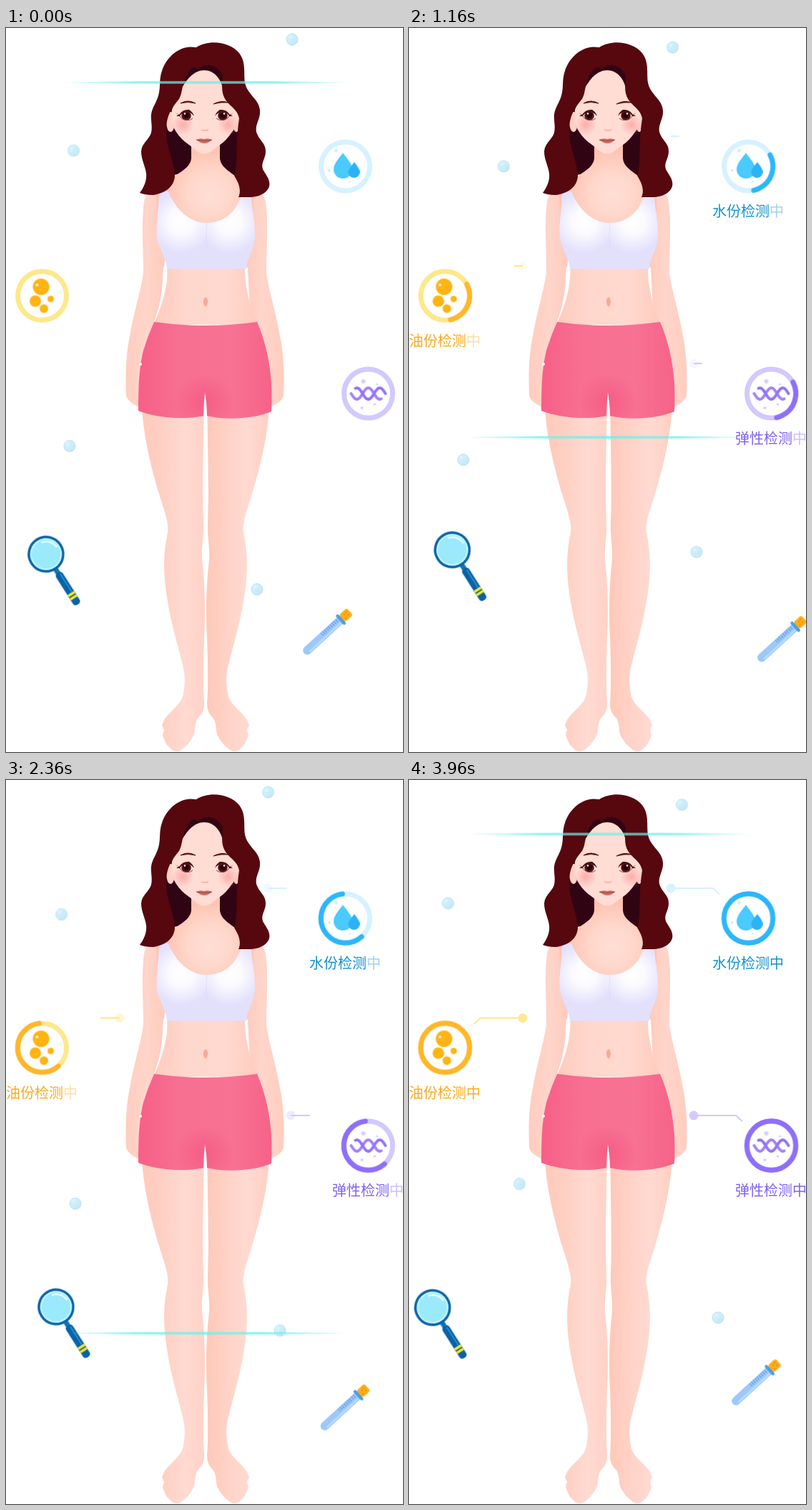
Animation, 555 px wide and 1010 px high, one loop 4 s. Source, as an HTML page:

```html
<!DOCTYPE html>
<html lang="zh-CN">
<head>
<meta charset="utf-8">
<title>检测中</title>
<style>
html, body { margin: 0; width: 100%; height: 100%; overflow: hidden; background: #fff; }
svg { display: block; width: 555px; height: 1010px; }
text { font: 20px "Noto Sans CJK SC", "Noto Sans CJK", sans-serif; }
.track, .arc, .link { fill: none; }
.track, .arc { stroke-width: 7; }
.arc { stroke-linecap: round; animation: spin 4s linear infinite, show 4s step-end infinite; }
.link { stroke-width: 2; stroke-dasharray: 1 1; }
.scan { animation: scan 4s linear infinite; }
@keyframes spin {
  0% { transform: rotate(-90deg); stroke-dasharray: 0 360; }
  99%, 100% { transform: rotate(1350deg); stroke-dasharray: 360 360; }
}
@keyframes show { 0% { opacity: 0; } 0.9%, 100% { opacity: 1; } }
@keyframes scan {
  0%, 99%, 100% { transform: translateY(75.5px); }
  50% { transform: translateY(929px); }
}
</style>
</head>
<body>
<svg viewBox="0 0 555 1010">
  <defs>
    <linearGradient id="legL">
      <stop offset="0" stop-color="#ffcabb"/><stop offset=".35" stop-color="#ffd0c4"/>
      <stop offset=".68" stop-color="#ffdad1"/><stop offset="1" stop-color="#ffd2c7"/>
    </linearGradient>
    <linearGradient id="legR">
      <stop offset="0" stop-color="#ffcfc3"/><stop offset=".35" stop-color="#ffdad1"/>
      <stop offset=".65" stop-color="#ffd3c8"/><stop offset="1" stop-color="#ffc8b8"/>
    </linearGradient>
    <linearGradient id="arm">
      <stop offset="0" stop-color="#ffcdbf"/><stop offset=".5" stop-color="#ffd5ca"/>
      <stop offset="1" stop-color="#fecabb"/>
    </linearGradient>
    <linearGradient id="belly">
      <stop offset="0" stop-color="#ffcbbc"/><stop offset=".3" stop-color="#ffd7cc"/>
      <stop offset=".7" stop-color="#ffd9cf"/><stop offset="1" stop-color="#ffcbbc"/>
    </linearGradient>
    <linearGradient id="shorts">
      <stop offset="0" stop-color="#f75f87"/><stop offset=".3" stop-color="#f76f91"/>
      <stop offset=".7" stop-color="#f77293"/><stop offset="1" stop-color="#f66289"/>
    </linearGradient>
    <radialGradient id="crotch">
      <stop offset="0" stop-color="#f65c85"/><stop offset="1" stop-color="#f65c85" stop-opacity="0"/>
    </radialGradient>
    <radialGradient id="chest" gradientUnits="userSpaceOnUse" cx="284" cy="232" r="62">
      <stop offset="0" stop-color="#ffded5"/><stop offset=".5" stop-color="#ffd7cb"/>
      <stop offset="1" stop-color="#ffc3b1"/>
    </radialGradient>
    <radialGradient id="cup">
      <stop offset="0" stop-color="#fff"/><stop offset=".4" stop-color="#fff" stop-opacity=".85"/>
      <stop offset="1" stop-color="#fff" stop-opacity="0"/>
    </radialGradient>
    <radialGradient id="blush">
      <stop offset="0" stop-color="#f98f90" stop-opacity=".62"/><stop offset="1" stop-color="#f98f90" stop-opacity="0"/>
    </radialGradient>
    <linearGradient id="beam">
      <stop offset="0" stop-color="#6cf0ea" stop-opacity=".1"/><stop offset=".25" stop-color="#6cf0ea" stop-opacity=".75"/>
      <stop offset=".75" stop-color="#6cf0ea" stop-opacity=".75"/><stop offset="1" stop-color="#6cf0ea" stop-opacity=".1"/>
    </linearGradient>
    <linearGradient id="drop" x2="1" y2="1">
      <stop offset="0" stop-color="#d9f4fd"/><stop offset="1" stop-color="#bfe6f8"/>
    </linearGradient>
    <clipPath id="shortsClip"><use href="#shortsShape"/></clipPath>
    <clipPath id="topClip"><use href="#topShape"/></clipPath>
    <path id="leg" d="M190 530 C193 575 204 617 214 650 C222 676 228 690 226 704 C219 735 220 765 226 800 C232 838 245 876 249 898 C251 912 249 924 247 933 C243 945 229 953 221 965 L218 973 L221 979 L219 987 L222 994 L225 1000 L230 1005 C234 1010 241 1010 245 1007 C254 1001 260 992 263 985 C265 975 264 970 268 963 C274 957 277 952 277 942 C275 915 276 880 277 850 C279 815 278 775 274 742 C273 722 277 708 276 690 C274 640 276 590 277 510 Z"/>
    <path id="armShape" d="M212 226 C199 228 194 234 193 243 C189 270 192 310 192 342 C188 368 178 400 173 430 C167 458 167 490 168 513 C170 520 178 525 186 529 L190 470 L206 412 C214 392 219 370 219 346 L226 300 L218 240 Z"/>
    <path id="shortsShape" d="M207 410 Q279 420 351 410 C362 435 369 465 371 496 Q372 516 371 535 C345 546 306 547 281 541 Q281 522 278 508 Q276 524 276 541 C250 547 210 544 185 534 C185 500 186 475 192 450 Q198 430 207 410 Z"/>
    <path id="topShape" d="M214 226 L227 228 C237 254 258 272 280 272 C303 272 320 259 328 236 L343 235 C344 254 349 275 348 294 C346 311 337 320 336 336 L225 336 C224 320 214 309 211 294 C209 272 214 251 214 226 Z"/>
    <g id="eye">
      <path d="M-10 0 Q-5 -8 4 -7 Q9 -4 11 2 Q4 8 -4 6 Q-8 4 -10 0" fill="#fbe6e1"/>
      <ellipse rx="6.8" ry="6.8" fill="#561318"/><circle r="4" fill="#210408"/>
      <circle cx="-2" cy="-2.5" r="1.2" fill="#fff"/>
      <path d="M-15 -4 L-10 -1 Q-5 -9 4 -8 Q9 -5 11 1 Q6 -5 1 -5.500 Q-6 -5 -9 1 L-14 1 L-11 -1 Z" fill="#4b0b11"/>
      <path d="M-9 1 Q-6 6 0 6.500 Q6 7 9 4" fill="none" stroke="#8c3a3a"/>
    </g>
    <g id="bubble"><circle r="8" fill="url(#drop)" stroke="#b8e2f2"/><circle cx="-2.5" cy="-3" r="2" fill="#def5fd"/></g>
    <g id="glass" transform="rotate(57.5)">
      <path d="M24 0H36" stroke="#1274b8" stroke-width="7"/>
      <rect x="31" y="-5.5" width="52" height="11" rx="4.5" fill="#0763a8"/>
      <path d="M34 -2H64" stroke="#2a86c6" stroke-width="2"/>
      <path d="M66 -5.5v11M71.5 -5.5v11" stroke="#ffe51d" stroke-width="3.6"/>
      <circle r="24" fill="#9beafb" stroke="#0b65a8" stroke-width="3.6"/>
      <circle r="21" fill="none" stroke="#c9f5fd" stroke-width="2"/>
      <path d="M-16 7 A18 18 0 0 1 -10 -15" transform="rotate(35)" fill="none" stroke="#e6fbff" stroke-width="2.5"/>
    </g>
    <g id="tube" transform="rotate(137.5)">
      <path d="M10 -6 H73 A6 6 0 0 1 73 6 H10 Z" fill="#9dc8fb"/>
      <path d="M12 -3.5H72" stroke="#b8d9ff" stroke-width="3"/>
      <path d="M14 2.5H43" stroke="#6aa2ee" stroke-width="5" stroke-dasharray="1.5 2"/>
      <rect x="7" y="-9" width="4.5" height="18" rx="2" fill="#4b9eea"/>
      <rect x="-7.5" y="-6.5" width="14.5" height="13" rx="3" fill="#ffad17"/>
      <path d="M-4 -2h2M0 2h2M2 -3h2M-4 3h2" stroke="#e48b0c" stroke-width="1.5"/>
    </g>
  </defs>

  <!-- figure -->
  <path d="M226 95 C232 65 254 44 282 44 C305 44 312 70 318 98 L328 130 V208 H318 L279 196 L230 206 C221 170 221 135 226 95" fill="#310413"/>
  <use href="#leg" fill="url(#legL)"/>
  <use href="#leg" fill="url(#legR)" transform="translate(558) scale(-1 1)"/>
  <use href="#armShape" fill="url(#arm)"/>
  <use href="#armShape" fill="url(#arm)" transform="translate(556) scale(-1 1)"/>
  <path d="M220 334 L217 392 L225 352 L226 334 Z M338 334 L341 394 L334 352 L333 334 Z" fill="#fff"/>
  <path d="M212 270 V300 L225 330 C227 352 222 380 206 414 H352 C338 382 333 352 334 330 L348 300 L346 270 Z" fill="url(#belly)"/>
  <path d="M259 160 V182 C257 200 231 203 210 230 L212 280 H346 V230 C326 204 301 200 299 182 V160 Z" fill="url(#chest)"/>
  <ellipse cx="279" cy="382" rx="3" ry="6.5" fill="#f8a995"/>
  <use href="#topShape" fill="#e3e0fc"/>
  <g clip-path="url(#topClip)">
    <circle cx="245" cy="270" r="44" fill="url(#cup)"/>
    <circle cx="313" cy="270" r="44" fill="url(#cup)"/>
    <path d="M281 272 Q279 290 281 308" fill="none" stroke="#d6d1f7" stroke-width="1.5" opacity=".4"/>
  </g>
  <use href="#shortsShape" fill="url(#shorts)"/>
  <ellipse cx="278" cy="522" rx="42" ry="40" fill="url(#crotch)" clip-path="url(#shortsClip)"/>
  <circle cx="188" cy="469" r="2" fill="#fff"/>

  <!-- head -->
  <g fill="#ffd0c5"><ellipse cx="230" cy="131" rx="6" ry="14"/><ellipse cx="322" cy="131" rx="5" ry="14"/></g>
  <path d="M232 114 C243 84 257 59 277 59 C295 59 304 78 304 92 L323 112 C326 126 322 138 316 145 Q308 157 299 163 L284 174 Q277 177 270 174 L256 163 Q245 156 238 145 C232 136 230 126 232 114" fill="#ffdcd4"/>
  <circle cx="247" cy="135" r="15" fill="url(#blush)"/>
  <circle cx="311" cy="135" r="15" fill="url(#blush)"/>
  <path d="M244 105 Q254 99 265 105 Q254 102 244 105 M290 106 Q301 100 311 104 Q301 103 290 106" fill="#5b1114" stroke="#5b1114"/>
  <use href="#eye" x="252" y="122"/>
  <use href="#eye" transform="translate(303 122) scale(-1 1)"/>
  <path d="M273 142 Q278 144 283 142" fill="none" stroke="#f4aa9e" stroke-width="1.6"/>
  <path d="M266 156 Q272 153 277 155 Q282 153 288 156 Q278 166 266 156" fill="#ce7068"/>
  <path d="M266 156 Q277 159 288 156" fill="none" stroke="#963f40"/>
  <path d="M187 230 C193 222 197 213 196 203 C195 193 189 184 189 172 C190 160 200 156 203 146 C205 136 202 129 203 120 C205 109 212 102 214 90 C216 80 214 71 218 60 C224 41 243 23 266 27 C285 15 314 20 326 35 C336 48 332 63 334 76 C337 93 354 99 355 115 C356 127 348 134 350 145 C353 156 363 160 363 172 C363 183 356 187 359 197 C363 205 370 211 368 221 C365 231 352 236 341 236 L325 236 C330 225 324 214 319 206 C325 190 320 165 326 126 C323 110 307 108 303 91 C300 78 307 66 298 59 C289 49 274 50 268 58 C265 52 260 55 256 61 C245 74 248 89 242 99 C232 111 224 122 224 142 C223 165 234 184 236 203 C237 222 221 231 205 233 Q194 233 187 230 Z" fill="#56080e"/>

  <g id="stations"></g>
  <g id="drift"></g>
  <g class="scan"><ellipse cx="279" rx="196" ry="1.9" fill="url(#beam)"/></g>
  <g id="labels"></g>
</svg>
<script>
const LOOP = 4000;
const $ = id => document.getElementById(id);
const loop = (el, frames) => el.animate(frames, { duration: LOOP, iterations: Infinity });
const dots = list => list.map(([x, y, r]) => `<circle cx="${x}" cy="${y}" r="${r}"/>`).join('');

// One strand of the helix icon; the second is the first turned by half a circle
const strand = 'M' + Array.from({ length: 22 }, (_, i) => {
  const x = i * 2 - 24;
  return `${x} ${(-8 * Math.cos(x * Math.PI / 16)).toFixed(1)}`;
}).join('L');

const stations = [
  { x: 474.5, y: 193, soft: '#d6f2fe', main: '#2cb7fb', ink: '#1492c8', word: '水份检测中', tx: 424, ty: 262.5,
    dot: [366, 151], path: 'M366 151H425L436 161.5',
    icon: `<path d="M-3.5 -19C2 -11 9.5 -4 9.5 4A13 13 0 0 1 -16.5 4C-16.5 -4 -9 -11 -3.5 -19" fill="#4bcafd"/>
      <path d="M12.5 -6C16 -1 20 3 20 8A8 8 0 0 1 4 8C4 3 9 -1 12.5 -6" fill="#2eb2f6"/>
      <g fill="#d3effc">${dots([[-13, -22, 2.5], [-23, 6, 2], [6, 21, 1.6]])}</g>` },
  { x: 50.5, y: 373.5, soft: '#fee88c', main: '#ffb62a', ink: '#f9ab1c', word: '油份检测中', tx: 0, ty: 443.5,
    dot: [159, 332], path: 'M159 332H100L89 342',
    icon: `<g fill="#ffb414">${dots([[-1.5, -12.5, 11.5], [-9.5, 7.5, 8], [12, 4.5, 4.5], [2.5, 18, 6]])}</g>
      <circle cx="-7" cy="-15" r="2" fill="#fff3d0"/>` },
  { x: 506.5, y: 510, soft: '#d2c9fd', main: '#8e6ffb', ink: '#7d62ee', word: '弹性检测中', tx: 456, ty: 579.5,
    dot: [398, 468], path: 'M398 468H457L468 478',
    icon: `<g fill="none" stroke-width="4" stroke-linecap="round"><path d="${strand}" stroke="#a583f8"/>
      <path d="${strand}" transform="rotate(180)" stroke="#9474fb"/></g>
      <g fill="#d8d0fd">${dots([[-7, -17, 3], [9, 15, 1.8], [-9, 20, 2], [12, -13, 1.5]])}</g>` }
];

// Sawtooth that reaches its end once a second
const saw = (prop, from, to) => [0, 1, 2, 3].flatMap(c => [
  { offset: c / 4 + (c ? .0099 : 0), [prop]: c ? from + (to - from) * .04 : from },
  { offset: (c + 1) / 4, [prop]: to },
  ...(c < 3 ? [{ offset: (c + 1) / 4 + .0098, [prop]: to }] : [])
]);

// Characters light up one by one, three rounds per loop
const ROUND = 1320, REST = [0, .13, .15, .25, .4, 1];
const lightUp = i => [0, 1, 2].flatMap(c => REST.map((rest, n) => ({
  offset: (c * ROUND + (n ? (n - .5) * ROUND / 5 : c && 30)) / LOOP,
  fillOpacity: i < n ? 1 : rest,
  easing: 'step-end'
})));

for (const s of stations) {
  $('stations').insertAdjacentHTML('beforeend', `
    <path class="link" d="${s.path}" pathLength="1" stroke="${s.soft}"/>
    <circle class="dot" cx="${s.dot[0]}" cy="${s.dot[1]}" r="6.5" fill="${s.soft}"/>
    <g transform="translate(${s.x} ${s.y})">
      <circle class="track" r="34" stroke="${s.soft}"/>
      <circle class="arc" r="34.3" pathLength="360" stroke="${s.main}"/>
      ${s.icon}
    </g>`);
  const chars = [...s.word].map(ch => `<tspan>${ch}</tspan>`).join('');
  $('labels').insertAdjacentHTML('beforeend', `<text x="${s.tx}" y="${s.ty}" fill="${s.ink}">${chars}</text>`);
}
document.querySelectorAll('.link').forEach(el => loop(el, saw('strokeDashoffset', 1, 0)));
document.querySelectorAll('.dot').forEach(el => loop(el, saw('opacity', 0, 1)));
document.querySelectorAll('tspan').forEach((el, k) => loop(el, lightUp(k % 5)));

const stops = [0, .11, .29, .45, .59, .75, .99, 1];
const drifters = [
  ['bubble', [400, 16], [403, 9], [368.5, 27], [363, 28.5], [366.5, 17], [385.5, 39.5], [381.5, 34.5]],
  ['bubble', [94.5, 171], [104, 195.5], [132.5, 193], [79, 202.5], [77.5, 187.5], [86, 184], [54.5, 172]],
  ['bubble', [89, 583], [73, 608.5], [76, 602.5], [96, 565], [97, 591], [101, 610], [154.5, 563.5]],
  ['bubble', [351, 783], [350, 787.5], [402, 731], [387, 725], [383, 768], [434.5, 737], [432, 750]],
  ['glass', [56, 734], [45, 743], [60.5, 728], [97, 731], [70, 735], [74.5, 729], [33, 736]],
  ['tube', [475, 819], [483, 832], [547, 829], [515, 849], [499.5, 852], [480.5, 837.5], [511, 817]]
];
for (const [shape, ...pts] of drifters) {
  $('drift').insertAdjacentHTML('beforeend', `<g><use href="#${shape}"/></g>`);
  loop($('drift').lastElementChild, stops.map((offset, i) => {
    const [x, y] = pts[Math.min(i, pts.length - 1)];
    return { offset, transform: `translate(${x}px, ${y}px)` };
  }));
}
</script>
</body>
</html>
```
